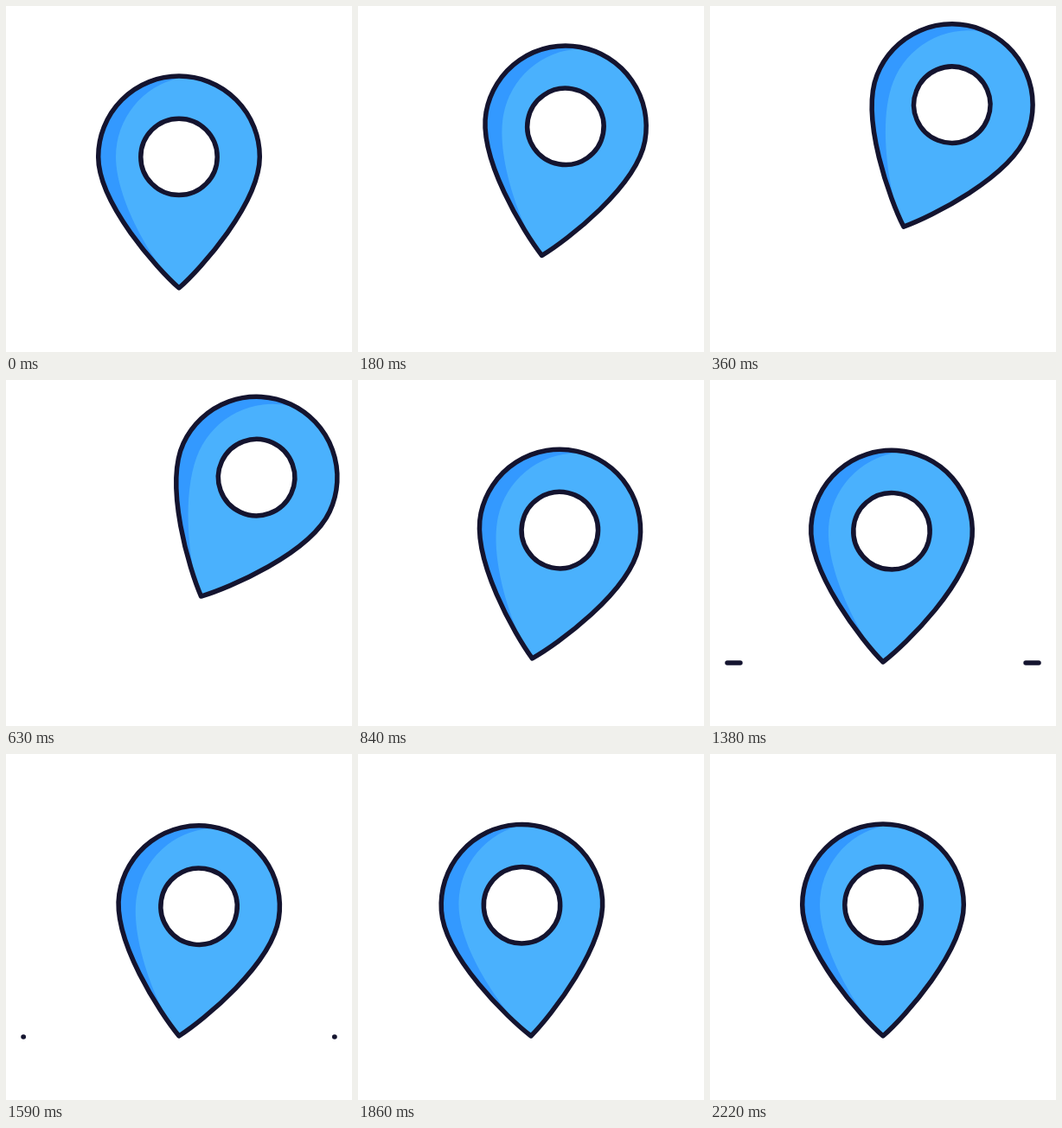
Animation of 400 by 400 pixels, one loop 3460 ms. Source, as an HTML page:

```html
<!DOCTYPE html>
<html lang="en">
<head>
<meta charset="utf-8">
<title>Bouncing map pin</title>
<style>
  html, body { margin: 0; width: 100%; height: 100%; overflow: hidden; background: #fff; }
  svg { display: block; width: 100%; height: 100%; }
  .ink { stroke: #14142f; stroke-width: 5.5; stroke-linecap: round; stroke-linejoin: round; }
</style>
</head>
<body>
<svg viewBox="0 0 400 400">
  <g id="dashes" class="ink">
    <line id="left" y1="327" y2="327"/>
    <line id="right" y1="327" y2="327"/>
  </g>
  <!-- The pin is drawn around its tip at 0,0 -->
  <g id="pin">
    <path id="body" fill="#4ab1fd"/>
    <path fill="#3399ff" d="M0-245A93.3 93.3 0 0 0-93.3-151.7C-93.3-98-25-22 0 0C-24-20-73-98-73-151.7A93.3 93.3 0 0 1 0-242.8Z"/>
    <path id="outline" class="ink" fill="none"/>
    <circle class="ink" cy="-151.6" r="44.2" fill="#fff"/>
  </g>
</svg>
<script>
const LOOP = 3460, STEP = 30, LAST = 74;
const $ = id => document.getElementById(id);
const shape = "M0 0C-25-22-93.3-98-93.3-151.7A93.3 93.3 0 0 1 93.3-151.7C93.3-98 25-22 0 0Z";
$("body").setAttribute("d", shape);
$("outline").setAttribute("d", shape);

const smooth = u => u * u * (3 - 2 * u);

// Cubic bezier with handles (1/3, 0) and (0.2, 1): a quick start and a long settle.
function settle(u) {
  let lo = 0, hi = 1;
  for (let i = 0; i < 24; i++) {
    const s = (lo + hi) / 2, r = 1 - s;
    if (r * r * s + 0.6 * r * s * s + s * s * s < u) lo = s; else hi = s;
  }
  return smooth(lo);
}

// Keys are [time, value, easing towards this key].
function track(keys, f) {
  for (let i = 1; i < keys.length; i++) {
    const [a, from] = keys[i - 1], [b, to, ease = smooth] = keys[i];
    if (f <= b) return from + (to - from) * ease((f - a) / (b - a));
  }
  return keys[keys.length - 1][1];
}

const lift = [[0, 0], [19, 1, settle], [20, 1], [29.3, 0]];
const swing = [[0, 0], [20.7, 25, settle], [22.7, 25], [37.5, -18.9], [50, 11], [62.3, -4], [74, 0]];
const lead = [[30, 77.7], [45, 20]];
const trail = [[30, 77.7], [54, 20]];

function setSpan(id, x1, x2) {
  $(id).setAttribute("x1", x1);
  $(id).setAttribute("x2", x2);
}

function draw(ms) {
  const f = Math.min(LAST, Math.floor(ms / STEP));
  const h = track(lift, f);
  $("pin").setAttribute("transform",
    `translate(${200 + 26.4 * h} ${326 - 78.5 * h}) rotate(${track(swing, f)})`);

  const shown = f > 30 && f < 54;
  $("dashes").setAttribute("visibility", shown ? "visible" : "hidden");
  if (shown) {
    const a = track(lead, f), b = track(trail, f);
    setSpan("left", a, b);
    setSpan("right", 400 - b, 400 - a);
  }
}

const start = performance.now();
function tick() {
  draw((performance.now() - start) % LOOP);
  requestAnimationFrame(tick);
}
tick();
</script>
</body>
</html>
```
